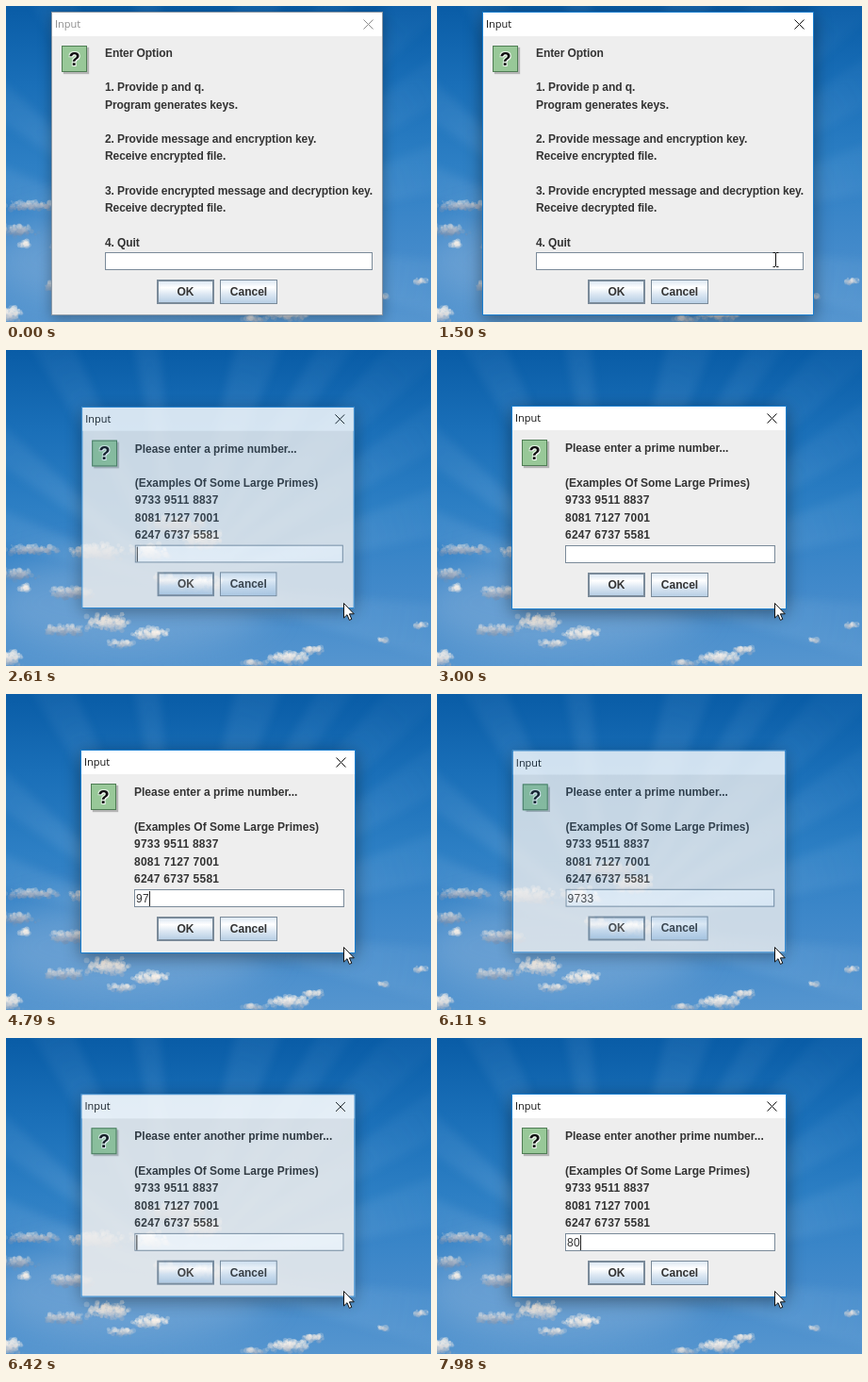
Recreate the animation shown at these times as an HTML page with a canvas. Size 451 px wide and 335 px high, loop 8 s.

```html
<!DOCTYPE html>
<html lang="en">
<head>
<meta charset="utf-8">
<title>Input dialogs</title>
<style>
html, body { margin: 0; width: 100%; height: 100%; overflow: hidden; background: #2a7cc2; }
#stage { position: relative; width: 451px; height: 335px; overflow: hidden; }
#stage * { position: absolute; box-sizing: border-box; }
#sky { left: 0; top: 0; }
.win {
  background: #eee; border: 1px solid #1b7fd0; color: #333;
  font: bold 12px "Liberation Sans", Arial, sans-serif;
  box-shadow: 0 4px 17px rgba(0, 0, 0, .42);
}
.win > * { white-space: pre; }
.bar { left: 0; right: 0; top: 0; height: 25px; background: #fff; color: #111; }
.bar span { left: 3px; top: 0; font: 11px/24px "Open Sans", "Noto Sans", sans-serif; }
.bar svg { right: 9px; top: 7px; stroke: currentColor; fill: none; }
.idle { border-color: #8b98a5; box-shadow: 0 3px 13px rgba(0, 0, 0, .32); }
.idle .bar { color: #8c8c8c; }
.closing .bar svg { display: none; }
.icon {
  left: 10px; top: 35px; width: 27px; height: 28px; background: #98c898;
  border: 1px solid #4f7d54; box-shadow: 2px 2px 1px #b4b4b4; color: #111;
  font-size: 20px; line-height: 26px; text-align: center;
  text-shadow: 1px 1px #fff, -1px -1px #dff0df, 1px -1px #dff0df, -1px 1px #dff0df;
}
.field { height: 19px; background: #fff; border: 1px solid #7a8a99; }
.field span { left: 1px; top: 1px; font-weight: normal; line-height: 16px; letter-spacing: .33px; }
.field i { top: 1px; width: 1px; height: 16px; background: #222; }
.btn {
  width: 61px; height: 26px; border: 1px solid #7a8a99; text-align: center; line-height: 24px;
  background: linear-gradient(#dde8f3, #fff 30%, #dde8f3 60%, #b8cfe5);
}
.main { border-width: 2px; line-height: 22px; }
#arrow, #beam { left: 0; top: 0; overflow: visible; }
</style>
</head>
<body>
<div id="stage">
  <canvas id="sky" width="451" height="335"></canvas>
  <svg id="arrow" width="13" height="20"><path d="M.5 .5V16L4 12.7 6.4 18.4 8.8 17.3 6.4 11.8H11.3Z" fill="#fff" stroke="#111"/></svg>
  <svg id="beam" width="8" height="17"><path d="M-3 -7.5H-.5M.5 -7.5H3M0 -7V7M-3 7.5H-.5M.5 7.5H3" stroke="#111"/></svg>
</div>
<script>
const LOOP = 8000;
const stage = document.getElementById("stage");
const arrow = document.getElementById("arrow");
const beam = document.getElementById("beam");

function paintSky() {
  const c = document.getElementById("sky").getContext("2d");
  let seed = 11;
  const rnd = () => (seed = seed * 16807 % 2147483647) / 2147483647;
  const spread = () => rnd() + rnd() - 1;

  const base = c.createLinearGradient(0, 0, 0, 335);
  ["#095ca6", "#1a6fb8", "#2d7fc4", "#4189ca", "#5595cf"].forEach((col, i) => base.addColorStop(i / 4, col));
  c.fillStyle = base;
  c.fillRect(0, 0, 451, 335);

  // Sun rays fanning out from behind the clouds
  const glow = c.createRadialGradient(185, 250, 10, 185, 250, 330);
  glow.addColorStop(0, "rgba(200,222,245,.2)");
  glow.addColorStop(1, "rgba(170,210,245,.04)");
  c.fillStyle = glow;
  c.filter = "blur(5px)";
  for (const [deg, half] of [[-72, 5], [-52, 4], [-28, 4], [-8, 3], [18, 5], [33, 3], [45, 4], [58, 4], [74, 5], [100, 6]]) {
    c.beginPath();
    c.moveTo(185, 250);
    for (const side of [-half, half]) {
      const a = (deg + side) * Math.PI / 180;
      c.lineTo(185 + 450 * Math.sin(a), 250 - 450 * Math.cos(a));
    }
    c.fill();
  }
  c.filter = "blur(18px)";
  c.fillStyle = "rgba(190,208,230,.28)";
  c.beginPath();
  c.ellipse(130, 268, 150, 52, 0, 0, 7);
  c.fill();
  c.filter = "blur(.6px)";

  // x, y, width, height, brightness
  const clouds = [
    [28, 212, 62, 11, .35], [14, 238, 44, 12, .3], [20, 253, 14, 8, .9], [62, 297, 46, 12, .45],
    [4, 327, 34, 15, .75], [107, 289, 50, 20, .85], [153, 301, 40, 14, .9], [122, 312, 30, 9, .6],
    [95, 214, 66, 19, .55], [182, 186, 66, 20, .2], [208, 201, 46, 20, .6], [152, 214, 46, 18, .55],
    [207, 248, 48, 17, .85], [172, 243, 34, 13, .6], [300, 326, 48, 14, .85], [326, 318, 24, 9, .7],
    [441, 292, 16, 7, .7], [400, 308, 14, 5, .6], [264, 332, 30, 6, .5], [70, 258, 54, 14, .4]
  ];
  for (const [x, y, w, h, light] of clouds) {
    for (let n = w * h / 5; n > 0; n--) {
      const dx = spread(), dy = spread();
      const lit = Math.max(0, Math.min(1, light - dy * .6));
      const mix = (a, b) => Math.round(a + (b - a) * lit);
      c.fillStyle = `rgba(${mix(122, 255)},${mix(146, 246)},${mix(178, 236)},${.16 + .24 * rnd()})`;
      c.beginPath();
      c.arc(x + dx * w / 2, y + dy * h / 2, .8 + 2.4 * rnd(), 0, 7);
      c.fill();
    }
  }
}

function add(parent, cls, css, text = "", tag = "div") {
  const el = document.createElement(tag);
  el.className = cls;
  for (const key in css) el.style[key] = typeof css[key] === "number" ? css[key] + "px" : css[key];
  el.textContent = text;
  parent.append(el);
  return el;
}

function makeDialog({ left, top, width, height, lines, gap, step, fieldTop, fieldWidth, btnTop }) {
  const win = add(stage, "win", { left, top, width, height });
  stage.insertBefore(win, arrow);
  const bar = add(win, "bar", {});
  add(bar, "", {}, "Input", "span");
  bar.insertAdjacentHTML("beforeend", '<svg width="11" height="11"><path d="M.5 .5l10 10M10.5 .5l-10 10"/></svg>');
  add(win, "icon", {}, "?");
  lines.forEach((line, i) => add(win, "", {
    left: 56, top: gap + i * step, lineHeight: step + "px",
    letterSpacing: /^[\d ]+$/.test(line) ? ".25px" : lines.length > 8 ? "-.08px" : "0"
  }, line));
  const field = add(win, "field", { left: 56, top: fieldTop, width: fieldWidth });
  const text = add(field, "", {}, "", "span");
  const caret = add(field, "", {}, "", "i");
  add(win, "btn main", { left: 160 - left - 1, top: btnTop }, "OK");
  add(win, "btn", { left: 227 - left - 1, top: btnTop }, "Cancel");
  return { win, text, caret };
}

const primeDialog = first => makeDialog({
  left: 79, top: 59, width: 292, height: 216, gap: 34.6, step: 18.5,
  fieldTop: 147, fieldWidth: 223, btnTop: 176,
  lines: [first, "", "(Examples Of Some Large Primes)", "9733 9511 8837", "8081 7127 7001", "6247 6737 5581"]
});

const dialogs = [
  makeDialog({
    left: 48, top: 6, width: 352, height: 322, gap: 33.7, step: 18.27,
    fieldTop: 254, fieldWidth: 284, btnTop: 283,
    lines: ["Enter Option", "", "1. Provide p and q.", "Program generates keys.", "",
      "2. Provide message and encryption key.", "Receive encrypted file.", "",
      "3. Provide encrypted message and decryption key.", "Receive decrypted file.", "", "4. Quit"]
  }),
  primeDialog("Please enter a prime number..."),
  primeDialog("Please enter another prime number...")
];

// time, dialog, scale, opacity, closing
const poses = [
  [0, 0, 1, 1], [2370, 0, .99, .75, 1], [2440, 0, .974, .4, 1],
  [2530, 1, .976, .38], [2610, 1, .991, .82], [2680, 1, .997, .95], [2750, 1, 1, 1],
  [6110, 1, .994, .8, 1], [6180, 1, .981, .45, 1], [6260, 1, .968, .12, 1],
  [6340, 2, .985, .55], [6420, 2, .996, .88], [6480, 2, 1, 1]
];

// time, field text, caret shown
const typing = [
  [0, "", 0], [810, "", 1], [1270, "", 0], [1800, "1", 1], [2370, "1", 0],
  [2530, "", 1], [3000, "", 0], [3520, "", 1], [4070, "", 0], [4390, "9", 1], [4790, "97", 1],
  [5250, "97", 0], [5400, "973", 1], [5630, "9733", 1], [6110, "9733", 0],
  [6340, "", 1], [6710, "", 0], [7260, "", 1], [7580, "8", 1], [7980, "80", 1]
];

const at = (table, t) => table.findLast(row => row[0] <= t);

function pointer(t) {
  if (t < 330) return [430, 360];
  if (t < 1420) {
    const k = Math.min(8, Math.floor((t - 330) / 80) + 1) / 8;
    const rest = (1 - k) ** 2;
    return [365.5 + 44 * rest, 265 + 80 * rest];
  }
  if (t < 1500) return [362.5, 267];
  return t < 2370 ? [359.5, 269] : [358, 268];
}

function draw(t) {
  const [, active, scale, opacity, closing] = at(poses, t);
  const [, value, caretOn] = at(typing, t);
  dialogs.forEach(({ win, text, caret }, i) => {
    win.style.display = i === active ? "block" : "none";
    if (i !== active) return;
    win.style.transform = scale === 1 ? "none" : `scale(${scale})`;
    win.style.opacity = opacity;
    win.classList.toggle("closing", !!closing);
    win.classList.toggle("idle", t < 810);
    text.textContent = value;
    caret.style.left = 1 + 7 * value.length + "px";
    caret.style.display = caretOn ? "block" : "none";
  });
  const [x, y] = pointer(t);
  const overField = t < 2370 && y < 280;
  arrow.style.display = overField ? "none" : "block";
  beam.style.display = overField ? "block" : "none";
  arrow.style.transform = beam.style.transform = `translate(${x}px, ${y}px)`;
}

paintSky();
const start = performance.now();
function tick() {
  draw((performance.now() - start) % LOOP);
  requestAnimationFrame(tick);
}
draw(0);
requestAnimationFrame(tick);
</script>
</body>
</html>
```
